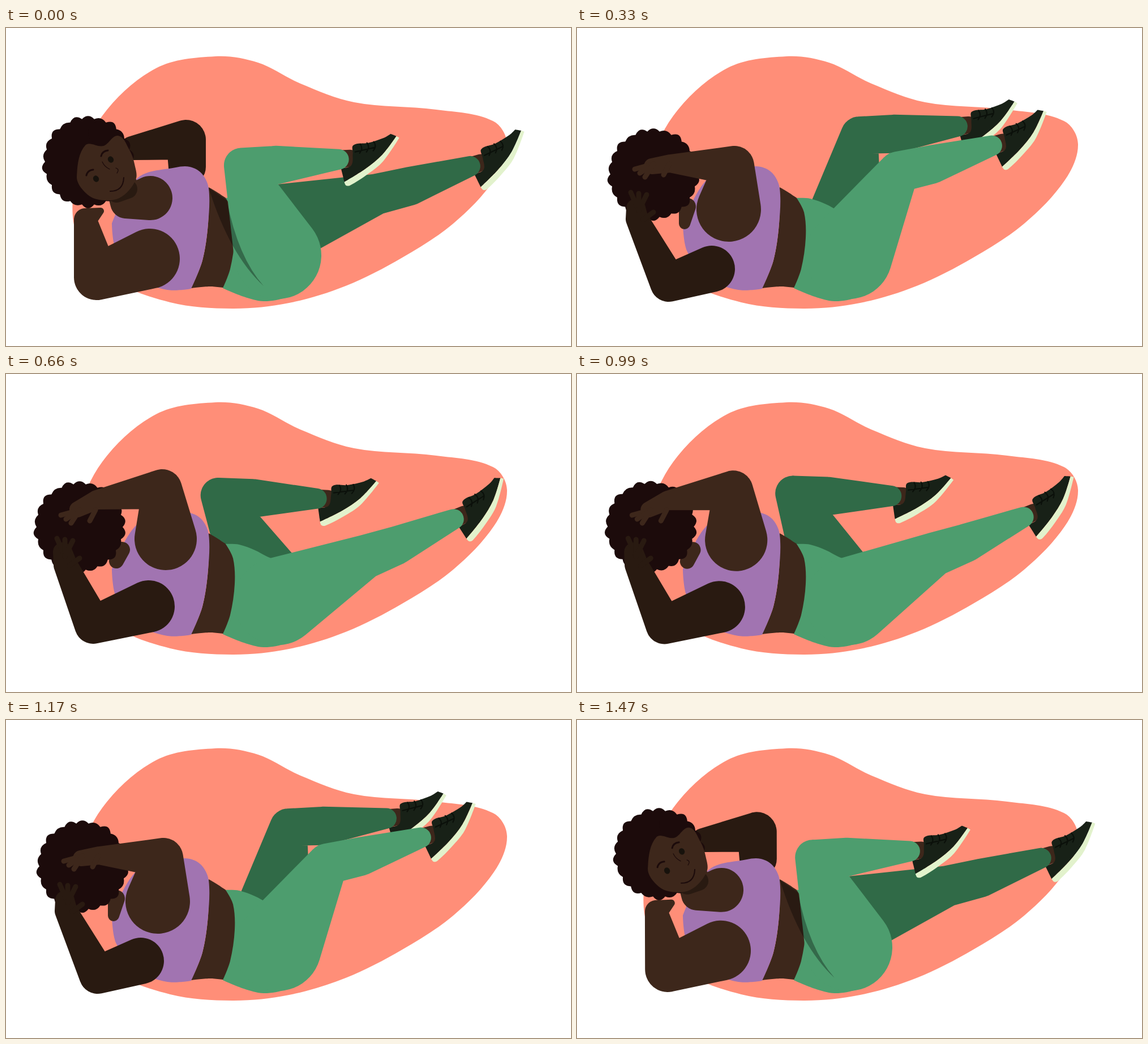
An HTML page for the animation above (1500 ms loop, 998 px wide and 561 px high).

```html
<!DOCTYPE html>
<html lang="en">
<head>
<meta charset="utf-8">
<title>Bicycle crunch</title>
<style>
html, body { margin: 0; width: 100%; height: 100%; overflow: hidden; background: #fff; }
svg { display: block; width: 100vw; height: 100vh; }
</style>
</head>
<body>
<svg id="stage" viewBox="0 0 998 561"></svg>
<script>
const SKIN = '#3d271b', SHADE = '#291a11', HAIR = '#1c0b0b', BRA = '#a174b1';
const GREEN = '#4d9d6e', DEEP = '#306a47', SHOE = '#182117', SOLE = '#e2f2cc';
const LOOP = 1500, MOVE = 600, RETURN = 990, TURN = 270, STEP = 30;
const FRONT_END = 0.2, BACK_START = 0.62;

const stage = document.getElementById('stage');
const mix = (a, b, k) => a + (b - a) * k;
const blend = (a, b, k) => a.map((joint, i) => joint.map((v, j) => mix(v, b[i][j], k)));
const polar = (x, y, r, angle) => [x + r * Math.cos(angle), y + r * Math.sin(angle)];

function add(tag, attrs, parent = stage) {
  const node = document.createElementNS('http://www.w3.org/2000/svg', tag);
  for (const name in attrs) node.setAttribute(name, attrs[name]);
  return parent.appendChild(node);
}

// Closed smooth outline through "x,y" points; a trailing "!" marks a corner.
function outline(text) {
  const points = text.trim().split(/\s+/).map(item => {
    const [x, y] = item.split(',').map(parseFloat);
    return { x, y, corner: item.endsWith('!') };
  });
  const at = i => points[(i + points.length) % points.length];
  const handle = (i, length) => {
    const p = at(i), a = at(i - 1), b = at(i + 1);
    const k = p.corner ? 0 : length / 3 / Math.hypot(b.x - a.x, b.y - a.y);
    return [p.x + (b.x - a.x) * k, p.y + (b.y - a.y) * k];
  };
  return points.reduce((d, p, i) => {
    const q = at(i + 1), length = Math.hypot(q.x - p.x, q.y - p.y);
    return d + `C${handle(i, length)} ${handle(i + 1, -length)} ${q.x},${q.y}`;
  }, `M${points[0].x},${points[0].y}`) + 'Z';
}

// Tapered link around two circles [x, y, r].
function link([x1, y1, r1], [x2, y2, r2]) {
  const along = Math.atan2(y2 - y1, x2 - x1);
  const ratio = (r1 - r2) / Math.hypot(x2 - x1, y2 - y1);
  const spread = Math.acos(Math.max(-0.999, Math.min(0.999, ratio)));
  const wide = spread > Math.PI / 2 ? 1 : 0;
  return `M${polar(x1, y1, r1, along + spread)}A${r1} ${r1} 0 ${1 - wide} 1 ${polar(x1, y1, r1, along - spread)}` +
    `L${polar(x2, y2, r2, along - spread)}A${r2} ${r2} 0 ${wide} 1 ${polar(x2, y2, r2, along + spread)}Z`;
}

const chain = joints => joints.slice(1).map((joint, i) => link(joints[i], joint)).join('');

function shape(color, points, parent) {
  return add('path', { d: outline(points), fill: color }, parent);
}

function limb(color, from, to, parent) {
  const node = add('path', { fill: color }, parent);
  return k => node.setAttribute('d', chain(blend(from, to, k)));
}

// Round head of hair with a ring of curls of slightly uneven size.
function curls(cx, cy, parent) {
  const count = 22, turn = 2 * Math.PI / count;
  let d = `M${polar(cx, cy, 76, 0)}`;
  for (let i = 1; i <= count; i++) {
    const bulge = 86 + 3 * Math.sin(i * 2.4);
    d += `Q${polar(cx, cy, bulge, (i - 0.5) * turn)} ${polar(cx, cy, 76, i * turn)}`;
  }
  return add('path', { d, fill: HAIR }, parent);
}

function makeFoot() {
  const foot = add('g', {});
  add('path', { d: link([0, 0, 16], [20, -2, 15]), fill: SKIN }, foot);
  shape(SHOE, '26,-25 52,-29 80,-38 92,-45! 102,-41! 77,-8 47,17 10,40! 4,15! 22,11 25,-10', foot);
  shape(SOLE, '10,40! 47,17 77,-8 102,-41! 107,-38! 78,4 50,27 20,46 13,46', foot);
  let laces = 'M29 -13L64 -21';
  for (let i = 0; i < 3; i++) laces += `M${38 + 12 * i} ${-27 - 2 * i}q6 8 -1 16`;
  add('path', { d: laces, fill: 'none', stroke: '#0b100a', 'stroke-width': 2.2, 'stroke-linecap': 'round' }, foot);
  return foot;
}

// Thigh and shank swing about the hip; the foot stays fixed to the shank.
function makeLeg(color, { hip, thigh, shank, knee, thighLength, shankLength }) {
  const foot = makeFoot(), node = add('path', { fill: color });
  const rad = Math.PI / 180;
  return p => {
    const [top] = blend([hip[0]], [hip[1]], p);
    const tilt = mix(...shank, p), kneeSize = mix(...knee, p);
    const bend = polar(top[0], top[1], thighLength, mix(...thigh, p) * rad);
    const calf = polar(...bend, 0.35 * shankLength, (tilt + 3) * rad);
    const cuff = polar(...bend, shankLength, tilt * rad);
    node.setAttribute('d', chain([top, [...bend, kneeSize], [...calf, 34], [...cuff, 18]]));
    foot.setAttribute('transform', `translate(${cuff}) rotate(${tilt + 3.6})`);
  };
}

shape('#ff8e78', `170,155 265,71 370,50 445,61 520,98 615,131 760,144 860,164 885,205 862,268
  790,345 700,405 600,455 500,485 400,495 290,484 190,443 125,365 124,262`);

const farLeg = makeLeg(DEEP, {
  hip: [[490, 345, 70], [455, 365, 70]], thigh: [-17.5, -118], shank: [-16.6, 1.9],
  knee: [36, 31], thighLength: 171, shankLength: 174
});

const raised = add('g', {});
const restingArm = limb(SHADE,
  [[320, 245, 33], [318, 197, 35], [222, 212, 21]],
  [[310, 255, 20], [290, 240, 25], [225, 230, 16]], raised);

shape(SKIN, '358,281! 378,293 398,310 410,350 408,400 390,459! 360,456 327,459! 347,410 357,345');
shape(BRA, '187,345! 232,265 300,246 325,245 346,257 358,283 357,345 347,410 327,460! 285,462 235,443 195,395');

const front = add('g', {}), back = add('g', {});

const frontParts = [
  restingArm,
  limb(SKIN,
    [[255, 300, 39], [212, 308, 28], [205, 280, 28]],
    [[266, 278, 30], [215, 283, 25], [190, 305, 25]], front)
];
const frontHair = curls(145, 236, front);
const face = add('g', {}, front);
add('path', { d: link([195, 290, 18], [215, 284, 17]), fill: SHADE }, face);
shape(SKIN, '140,207 172,208 198,190 218,215 227,240 229,268 200,300 160,302 136,286 125,262', face);
const features = add('g', { fill: 'none', stroke: HAIR, 'stroke-linecap': 'round' }, face);
for (const [x, y] of [[159, 266], [185, 232]]) {
  add('ellipse', { cx: x, cy: y, rx: 5, ry: 5.8, fill: '#17120c', stroke: 'none', transform: `rotate(-28 ${x} ${y})` }, features);
  add('path', { d: `M${x - 17} ${y - 6}q2 -9 12 -10`, 'stroke-width': 3 }, features);
}
add('path', { d: 'M170 236Q174 245 183 249M194 247Q201 249 196 256', 'stroke-width': 1.2 }, features);
add('path', { d: 'M184 288Q207 288 208 264', 'stroke-width': 2 }, features);
frontParts.push(
  limb(HAIR, [[165, 185, 20], [185, 183, 10]], [[165, 165, 20], [222, 190, 14]], front),
  limb(SKIN,
    [[254, 407, 53], [160, 440, 40], [140, 338, 20], [167, 323, 6]],
    [[258, 377, 54], [185, 430, 33], [126, 322, 21], [118, 300, 17]], front)
);

const backParts = [
  limb(SKIN, [[190, 345, 10], [195, 315, 15]], [[195, 330, 13], [205, 310, 14]], back)
];
const backHair = curls(0, 0, back);
backParts.push(
  limb(SHADE,
    [[238, 425, 41], [162, 450, 33], [106, 337, 20], [104, 318, 17]],
    [[252, 410, 46], [154, 443, 33], [105, 337, 21], [100, 314, 17]], back),
  limb(SKIN,
    [[268, 320, 57], [278, 243, 35], [165, 239, 16], [132, 244, 14]],
    [[282, 291, 55], [276, 203, 35], [160, 222, 17], [126, 239, 14]], back)
);
// Fingers fan out from each palm.
const fingers = [[SHADE, 90, 290, 14, 2], [SKIN, 97, 249, 9, 7]].map(([color, x, y, dx, dy]) => {
  const hand = add('g', { stroke: color, 'stroke-width': 9, 'stroke-linecap': 'round' }, back);
  const palm = color === SKIN ? [130, 240] : [104, 322];
  for (let i = 0; i < 3; i++)
    add('path', { d: `M${palm}L${x + dx * i} ${y + dy * i}` }, hand);
  return hand;
});
add('path', { d: 'M158 240L148 259' }, fingers[1]);
add('path', { d: 'M112 338L130 325' }, fingers[0]);

shape(GREEN, '388,300! 412,301 440,311 461,322 477,328! 510,390 540,425! 525,455 495,475 455,482 420,474 383,459! 396,425 404,370 401,325');

const nearLeg = makeLeg(GREEN, {
  hip: [[480, 401, 77], [480, 401, 77]], thigh: [-112, -27], shank: [-3.6, -23],
  knee: [31, 39], thighLength: 171, shankLength: 172
});

const shadow = add('path', { opacity: 0.33 });
function castShadow(k) {
  const [a, b, c, d, e] = blend(
    [[358, 282], [390, 304], [410, 405], [455, 455], [395, 400]],
    [[408, 302], [424, 305], [418, 365], [427, 422], [408, 365]], k);
  shadow.setAttribute('d', `M${a}L${b}Q${c} ${d}Q${e} ${a}Z`);
}

const ease = u => u < 0.5 ? (2 * u) ** 2.6 / 2 : 1 - (2 - 2 * u) ** 2.6 / 2;
const show = (node, visible) => { node.style.display = visible ? '' : 'none'; };

function draw(time) {
  const t = Math.floor(time % LOOP / STEP) * STEP;
  const phase = t < RETURN ? Math.min(t, MOVE) : LOOP - t;
  const p = ease(phase / MOVE);
  const turned = phase >= TURN;

  farLeg(p);
  nearLeg(p);
  for (const node of [raised, front, shadow]) show(node, !turned);
  show(back, turned);
  if (turned) {
    const k = Math.max((p - BACK_START) / (1 - BACK_START), -0.5);
    backParts.forEach(part => part(k));
    backHair.setAttribute('transform', `translate(${mix(135, 130, k)} ${mix(258, 270, k)})`);
    fingers.forEach(hand => hand.setAttribute('transform', `translate(${mix(5, 0, k)} 0)`));
  } else {
    const k = Math.min(p / FRONT_END, 1.5);
    frontParts.forEach(part => part(k));
    castShadow(k);
    face.setAttribute('transform', `translate(${13.5 * k} ${-24.5 * k})`);
    frontHair.setAttribute('transform', `translate(${2 * k} ${-4 * k})`);
  }
}

const start = performance.now();
function tick() {
  draw(performance.now() - start);
  requestAnimationFrame(tick);
}
tick();
</script>
</body>
</html>
```
